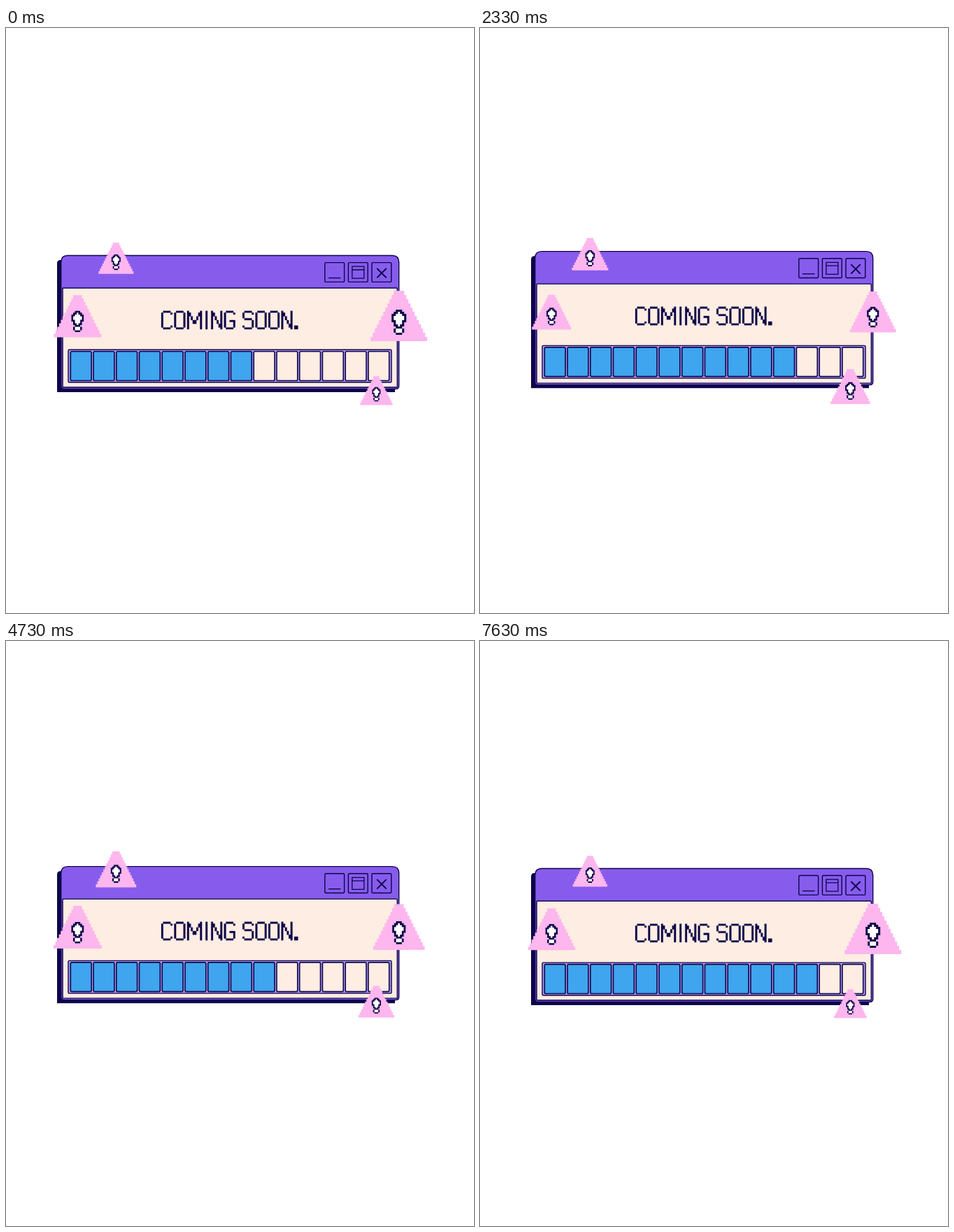
These frames come from a looping animation (669x837 px, 7.67 s). An HTML page:

```html
<!DOCTYPE html>
<html lang="en">
<head>
<meta charset="utf-8">
<title>Coming soon</title>
<style>
  html, body { margin: 0; width: 100%; height: 100%; overflow: hidden; background: #fff; }
  svg { display: block; width: 100%; height: 100%; }
</style>
</head>
<body>
<svg id="stage" viewBox="0 0 669 837" role="img" aria-label="COMING SOON."></svg>
<script>
const INK = '#0d0449', PURPLE = '#875ced', LILAC = '#b19af3';
const CREAM = '#fdede2', BLUE = '#3fa5ee', PINK = '#fdb6ee';
const LOOP = 7670, CYCLE = 48, CELLS = 14;

const stage = document.getElementById('stage');

function add(parent, tag, attrs) {
  const el = document.createElementNS('http://www.w3.org/2000/svg', tag);
  for (const key in attrs) el.setAttribute(key, attrs[key]);
  parent.appendChild(el);
  return el;
}

function box(parent, x, y, width, height, fill, line = 0, rx = 0) {
  return add(parent, 'rect', { x, y, width, height, fill, rx, stroke: INK, 'stroke-width': line });
}

function line(parent, d, width) {
  return add(parent, 'path', { d, fill: 'none', stroke: INK, 'stroke-width': width });
}

// Path covering every cell of a bitmap whose character is in `chars`
function bitmap(rows, chars, left = 0, top = 0) {
  let d = '';
  rows.forEach((row, y) => {
    for (let x = 0; x < row.length; x++) {
      const start = x;
      while (x < row.length && chars.includes(row[x])) x++;
      if (x > start) d += `M${left + start} ${top + y}h${x - start}v1h${start - x}z`;
    }
  });
  return d;
}

// Window, drawn at its lowest position
const panel = add(stage, 'g', {});
add(panel, 'path', { d: 'M73 521V337q0-5 5-5H120V500H556v21z', fill: INK });
add(panel, 'path', {
  d: 'M78.7 512V335q0-9.5 9.5-9.5H552q9.7 0 9.7 9.5V512q0 4.5-4.5 4.5H83q-4.3 0-4.3-4.5z',
  fill: PURPLE, stroke: INK, 'stroke-width': 1.4
});
box(panel, 81, 372, 478.3, 142, CREAM, 1.4, 1);

for (const x of [455.8, 489.4, 523]) box(panel, x, 335.6, 27.8, 27.8, 'none', 1.4, 1.5);
line(panel, 'M461 357.6h17.5', 1.4);
line(panel, 'M494.8 341.2h17v17h-17zM494.8 346h17', 1.3);
line(panel, 'M530.3 344l13.4 13.4M543.7 344l-13.4 13.4', 1.9);

// Pixel lettering
const side = '#....#';
const bowl = ['.####.', ...Array(8).fill(side), '.####.'];
const GLYPHS = {
  C: ['.####.', side, '#.....', '#.....', '#.....', '#.....', '#.....', '#.....', side, '.####.'],
  O: bowl,
  M: ['#......#', '##....##', '##....##', '#.#..#.#', '#.#..#.#', '#..##..#', '#..##..#',
      '#......#', '#......#', '#......#'],
  I: Array(10).fill('.#.'),
  N: [side, '##...#', '##...#', '#.#..#', '#.#..#', '#..#.#', '#..#.#', '#...##', '#...##', side],
  G: ['.####.', side, '#.....', '#.....', '#.....', '#..###', side, side, side, '.####.'],
  S: ['.####.', side, '#.....', '#.....', '.####.', '.....#', '.....#', '.....#', side, '.####.'],
  ' ': ['..'],
  '.': [...Array(8).fill('..'), '##', '##']
};

function lettering(text) {
  let x = 0, d = '';
  for (const ch of text) {
    d += bitmap(GLYPHS[ch], '#', x);
    x += GLYPHS[ch][0].length + 1;
  }
  return d;
}
add(panel, 'path', {
  d: lettering('COMING SOON.'), fill: INK, stroke: INK, 'stroke-width': 0.1,
  transform: 'translate(222 404.7) scale(2.64)'
});

// Progress bar
box(panel, 89, 460.2, 462, 46.8, LILAC, 1.4, 1.5);
const cells = Array.from({ length: CELLS }, (_, i) =>
  box(panel, 92.3 + 32.74 * i, 462.7, 29.8, 41.8, CREAM, 1.6, 1.8));

// Warning signs on a 27 x 24 grid, in tiers two rows high
const COLS = 27, TIERS = 12;
const BULB = [
  '..###..', '.##o##.', '##ooo##', '#ooooo#', '#ooooo#', '##ooo##',
  '.#ooo#.', '.##o##.', '..###..', '.#ooo#.', '.#ooo#.', '..###..'
];

function stepped() {
  let d = '';
  for (let i = 0; i < TIERS; i++) {
    const half = 2.5 + i;
    d += `M${-half} ${2 * i - TIERS}h${2 * half}v2h${-2 * half}z`;
  }
  return d;
}

// size: mean width, swing: change in width, peak: where in the cycle it is largest
const signs = [
  { x: 157.3, y: 329.5, size: 53, swing: 6, peak: 0.33 },
  { x: 102.3, y: 412.4, size: 63, swing: 7, peak: 0.125 },
  { x: 561.7, y: 412.1, size: 72.5, swing: 8.5, peak: 0 },
  { x: 529.4, y: 518.9, size: 51.8, swing: 5.6, peak: 0.5 }
];
for (const sign of signs) {
  sign.el = add(stage, 'g', {});
  add(sign.el, 'path', { d: stepped(), fill: PINK });
  add(sign.el, 'path', { d: bitmap(BULB, '#o', -3.5, -3), fill: INK });
  add(sign.el, 'path', { d: bitmap(BULB, 'o', -3.5, -3), fill: '#fff' });
}

const wave = phase => Math.cos(2 * Math.PI * phase);

// 12.5 poses per second, shown on a 30 Hz clock
function poseAt(ms) {
  const tick = Math.floor(ms * 0.03 + 0.11);
  return Math.max(0, Math.ceil(tick / 2.4) - 1) % CYCLE;
}

function render(ms) {
  const pose = poseAt(ms), phase = pose / CYCLE;
  const lift = -3.25 * (1 - wave(phase));
  panel.setAttribute('transform', `translate(0 ${lift})`);
  const filled = 8 + Math.floor((pose + 0.5) * 5 / CYCLE);
  cells.forEach((cell, i) => cell.setAttribute('fill', i < filled ? BLUE : CREAM));
  for (const { el, x, y, size, swing, peak } of signs) {
    const scale = (size + swing * wave(phase - peak)) / COLS;
    el.setAttribute('transform', `translate(${x} ${y + lift}) scale(${scale})`);
  }
}

const begin = performance.now();
function tick() {
  render((performance.now() - begin) % LOOP);
  requestAnimationFrame(tick);
}
tick();
</script>
</body>
</html>
```
